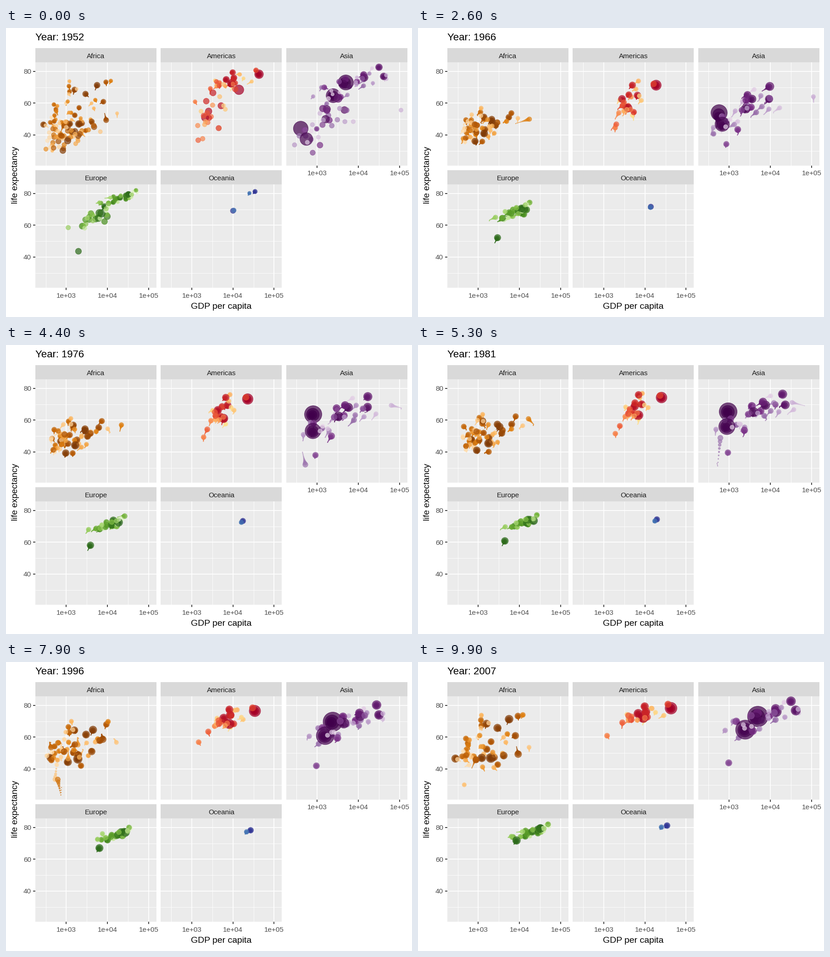
Animation, 885 px wide and 632 px high, one loop 10 s. Source, as a matplotlib script:

```python
import numpy as np
import matplotlib.pyplot as plt
from matplotlib.animation import FuncAnimation
from matplotlib.colors import LinearSegmentedColormap
from matplotlib.patches import Rectangle

W, H = 885, 632
FRAMES, WAKE = 100, 10
PX = 0.72                 # points per pixel at 100 dpi
PT = 1.71                 # chart points to pixels
YEARS = np.linspace(1952, 2007, FRAMES)
SURVEYS = np.arange(1952, 2008, 5)
KEYS = (1952, 1980, 2007)
PANEL_W, PANEL_H, STRIP_H = 264, 225.6, 31.4
X_UNIT, Y_UNIT = 89.8, 3.474
X_MIN, Y_MIN = 2.2486, 20.65

rng = np.random.default_rng(12)
plt.rcParams["font.family"] = "Liberation Sans"
fig = plt.figure(figsize=(W / 100, H / 100), dpi=100, facecolor="white")
ax = fig.add_axes([0, 0, 1, 1])
ax.set(xlim=(0, W), ylim=(H, 0))
ax.axis("off")


def box(x, y, w, h, color):
    ax.add_patch(Rectangle((x, y), w, h, fc=color, lw=0, zorder=0))


def line(x0, y0, x1, y1, width, color="white"):
    ax.plot([x0, x1], [y0, y1], color=color, lw=width * PX,
            solid_capstyle="butt", zorder=1)


def label(x, y, text, size, color, ha="center", **kw):
    return ax.text(x, y, text, fontsize=size * PX, color=color, ha=ha,
                   va="baseline", **kw)


class Panel:
    """One facet: its frame, axes and countries."""

    def __init__(self, name, col, row, ramp, x_axis=False, y_axis=False):
        self.left, self.bottom = 64 + 273.4 * col, 301 + 267 * row
        self.ramp = LinearSegmentedColormap.from_list(name, ramp.split())
        self.rows = []
        left, bottom = self.left, self.bottom
        top, right = bottom - PANEL_H, left + PANEL_W
        box(left, top, PANEL_W, PANEL_H, "#EBEBEB")
        box(left, top - STRIP_H, PANEL_W, STRIP_H, "#D9D9D9")
        label(left + PANEL_W / 2, top - 9.5, name, 15.2, "#1A1A1A")
        for v in (2.5, 3.5, 4.5):
            line(self.x(v), top, self.x(v), bottom, 0.9)
        for v in (30, 50, 70):
            line(left, self.y(v), right, self.y(v), 0.9)
        for v in (3, 4, 5):
            x = self.x(v)
            line(x, top, x, bottom, 1.8)
            if x_axis:
                line(x, bottom, x, bottom + 4.7, 1.8, "#333333")
                label(x, bottom + 21.5, f"1e+0{v}", 15.2, "#4D4D4D")
        for v in (40, 60, 80):
            y = self.y(v)
            line(left, y, right, y, 1.8)
            if y_axis:
                line(left - 4.7, y, left, y, 1.8, "#333333")
                label(left - 9, y + 5.5, str(v), 15.2, "#4D4D4D", "right")

    def x(self, log_gdp):
        return self.left + (log_gdp - X_MIN) * X_UNIT

    def y(self, life):
        return self.bottom - (life - Y_MIN) * Y_UNIT

    def add(self, pop0, pop1, years, log_gdp, life):
        root = np.interp(YEARS, (1952, 2007), np.sqrt([pop0, pop1]))
        self.rows.append((pop1,
                          self.x(np.interp(YEARS, years, log_gdp)),
                          self.y(np.interp(YEARS, years, life)),
                          2 + 10 * root / np.sqrt(1319)))

    def country(self, pop0, pop1, path):
        """Add one outstanding country from a few (gdp, life) points."""
        gdp, life = zip(*path.values())
        self.add(pop0, pop1, list(path), np.log10(gdp), life)

    def crowd(self, n, pops, growth, gdp, gdp_sd, life, life_sd, corr,
              skew=0.0, epidemic=0.0):
        """Add n countries scattered about the region's mean path."""
        def trend(values):
            return np.interp(SURVEYS, KEYS, values)

        # Evenly spread normal scores keep the cloud free of gaps.
        scores = np.sort(rng.normal(size=(300, n)), axis=1).mean(0)
        wealth = rng.permutation(scores)
        health = corr * wealth + np.sqrt(1 - corr ** 2) * rng.permutation(scores)
        wealth = wealth + skew * (wealth ** 2 - 1)
        size = rng.permutation(np.linspace(0, 1, n))
        age = (SURVEYS - 1980) / 55
        wave = np.exp(-((SURVEYS - 2004) / 8) ** 2)
        for z, h, q in zip(wealth, health, size):
            z = z + rng.normal(0, 0.5) * age
            h = h + rng.normal(0, 0.3) * age
            loss = epidemic * max(0, rng.normal(-0.4)) * wave
            x = trend(gdp) + trend(gdp_sd) * z + rng.normal(0, 0.035, len(age))
            y = trend(life) + trend(life_sd) * h + rng.normal(0, 0.4, len(age))
            pop = pops[0] * (pops[1] / pops[0]) ** q
            self.add(pop / growth, pop, SURVEYS, x, np.clip(y - loss, 30, 82))

    def tracks(self):
        """Colours, dark for large populations, and paths in mixed order."""
        order = rng.permutation(len(self.rows))
        pops = np.array([self.rows[i][0] for i in order])
        rank = np.argsort(np.argsort(-pops))
        return self.ramp(rank / (len(pops) - 1)), [self.rows[i][1:] for i in order]


africa = Panel("Africa", 0, 0, "#7F3B08 #B35806 #E08214 #FDB863 #FEE0B6", y_axis=True)
americas = Panel("Americas", 1, 0, "#A50026 #D73027 #F46D43 #FDAE61 #FEE090")
asia = Panel("Asia", 2, 0, "#40004B #762A83 #9970AB #C2A5CF #E7D4E8", x_axis=True)
europe = Panel("Europe", 0, 1, "#276419 #4D9221 #7FBC41 #B8E186 #E6F5D0", True, True)
oceania = Panel("Oceania", 1, 1, "#313695 #4575B4", x_axis=True)

africa.country(33, 135, {1952: (1077, 36.3), 1980: (1750, 45.3), 2007: (2014, 46.9)})
africa.country(22, 80, {1952: (1419, 41.9), 1980: (3200, 55), 2007: (5581, 71.3)})
africa.country(14, 65, {1952: (781, 39.1), 1980: (720, 47.8), 2007: (278, 46.5)})
africa.country(14, 44, {1952: (4725, 45), 1992: (7225, 61.9), 2007: (9270, 49.3)})
africa.country(2.5, 9, {1952: (493, 40), 1984: (870, 46), 1992: (737, 23.6),
                        1997: (590, 36.1), 2007: (863, 46.2)})
africa.country(1, 6, {1952: (2388, 42.7), 1967: (18773, 50.2), 1977: (21951, 57.4),
                      1990: (9500, 67.5), 2007: (12057, 74)})
africa.crowd(46, (76, 0.2), 3.6, (2.97, 3.1, 3.14), (0.27, 0.34, 0.41),
             (39, 51, 58), (4.8, 6, 7.5), 0.4, skew=0.2, epidemic=14)

americas.country(158, 301, {1952: (13990, 68.4), 1980: (24500, 74), 2007: (42952, 78.2)})
americas.country(57, 190, {1952: (2109, 50.9), 1980: (6900, 62.6), 2007: (9066, 72.4)})
americas.country(3.2, 8.5, {1952: (1840, 37.6), 1980: (1960, 51), 2007: (1202, 60.9)})
americas.country(15, 33, {1952: (11367, 68.8), 1980: (22700, 75.2), 2007: (36319, 80.7)})
americas.crowd(21, (108, 1), 2.9, (3.46, 3.75, 3.92), (0.2, 0.17, 0.24),
               (53, 66.5, 73.7), (8.6, 5.3, 3), 0.6)

asia.country(556, 1319, {1952: (400, 44), 1957: (576, 50.5), 1962: (488, 44.5),
                         1970: (645, 61.5), 1982: (962, 65.5), 2007: (4959, 73)})
asia.country(372, 1110, {1952: (547, 37.4), 1980: (830, 55.5), 2007: (2452, 64.7)})
asia.country(86, 127, {1952: (3217, 63), 1972: (14779, 73.4), 1990: (25800, 79),
                       2007: (31656, 82.6)})
asia.country(0.2, 2.5, {1952: (108382, 55.6), 1957: (113523, 58), 1972: (109348, 67.7),
                        1982: (31354, 71.3), 2007: (47307, 77.6)})
asia.country(4.7, 14, {1952: (368, 39.4), 1970: (430, 41), 1977: (525, 31.2),
                       1982: (624, 51), 2007: (1714, 59.7)})
asia.country(8.4, 32, {1952: (779, 28.8), 1980: (930, 39.3), 2007: (975, 43.8)})
asia.crowd(27, (223, 0.7), 3.2, (3.14, 3.61, 3.85), (0.33, 0.45, 0.47),
           (47.5, 63.5, 72), (8, 6, 4.8), 0.72)

europe.country(22, 71, {1952: (1969, 43.6), 1980: (4250, 60.2), 2007: (8458, 71.8)})
europe.country(69, 82, {1952: (7144, 67.5), 1980: (21500, 73.2), 2007: (32170, 79.4)})
europe.crowd(28, (61, 0.4), 1.25, (3.7, 4.13, 4.36), (0.25, 0.19, 0.23),
             (65.3, 72.7, 77.8), (4.6, 2.3, 2.5), 0.88, skew=-0.15)

oceania.country(8.7, 20, {1952: (10040, 69.1), 1980: (18900, 74), 2007: (34435, 81.2)})
oceania.country(2, 4.1, {1952: (10557, 69.4), 1980: (17100, 73), 2007: (25185, 80.2)})

colors, tracks = zip(*(p.tracks() for p in (africa, americas, asia, europe, oceania)))
colors = np.vstack(colors)
colors[:, 3] = 0.7
X, Y, SIZE = np.concatenate(tracks).transpose(1, 2, 0)

# Each point trails shrinking copies of its past, wrapping over the loop.
BACK = np.arange(WAKE, -1, -1)
FALLOFF = (1 - BACK / WAKE)[:, None] ** 3

label(468.8, 614, "GDP per capita", 19.4, "black")
label(25, 322, "life expectancy", 19, "black", rotation=90, rotation_mode="anchor")
title = label(64, 27, "", 22.2, "black", "left")
shades = np.tile(colors, (len(BACK), 1))
dots = ax.scatter(*np.zeros((2, len(shades))), c=shades, edgecolors=shades,
                  lw=0.9 * PX, zorder=3)


def draw(i):
    past = (i - BACK) % FRAMES
    diameter = (SIZE[past] * FALLOFF * 2.845 + 0.945) * 0.75 * PT * PX
    dots.set_offsets(np.column_stack([X[past].ravel(), Y[past].ravel()]))
    dots.set_sizes(diameter.ravel() ** 2)
    title.set_text(f"Year: {round(YEARS[i])}")
    return dots, title


anim = FuncAnimation(fig, draw, frames=FRAMES, interval=100, repeat=True,
                     repeat_delay=0, blit=False)
plt.show()
```
